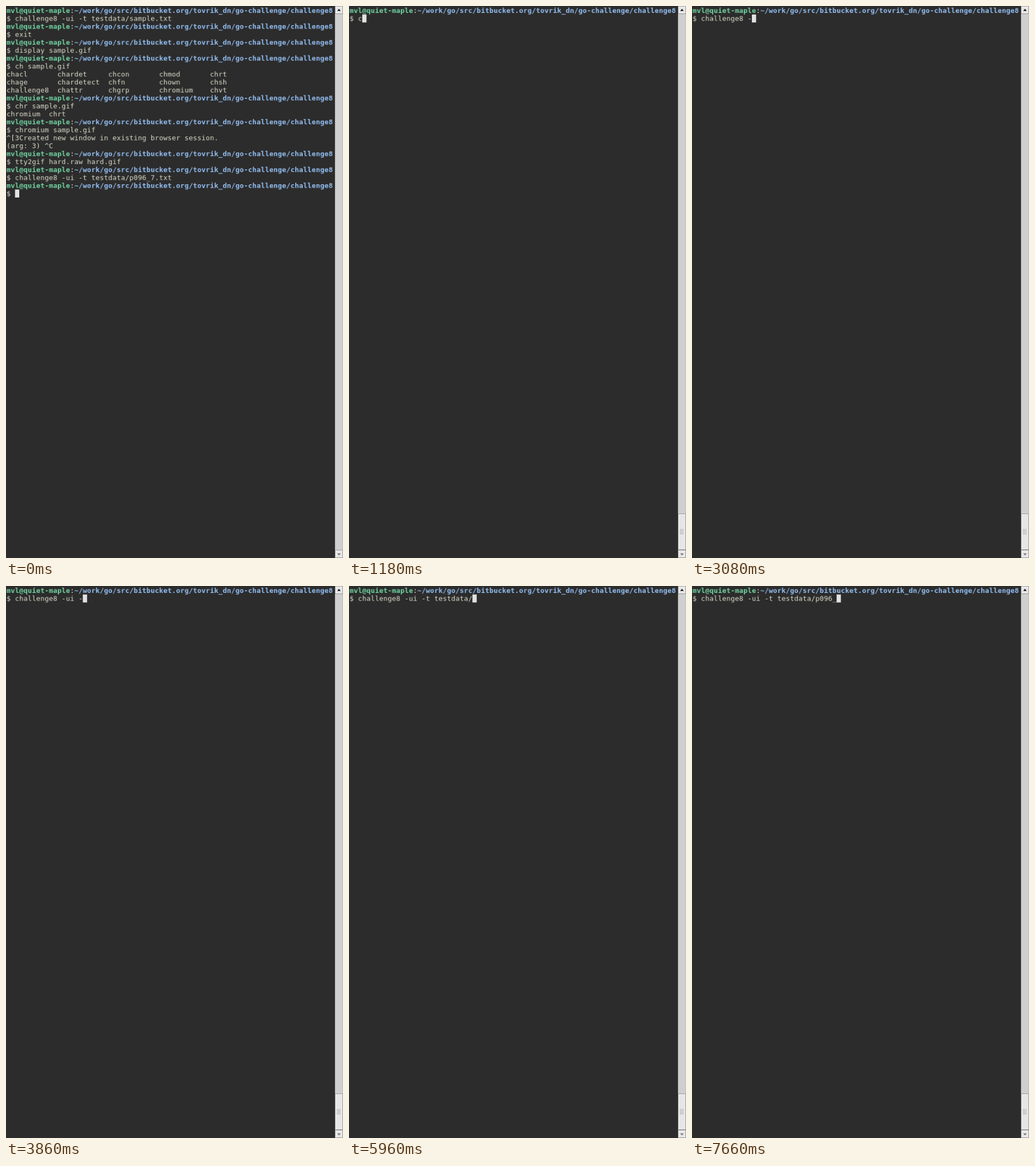
An HTML page with a canvas that plays this animation: 585 px wide and 957 px high, repeating every 8 s.

```html
<!DOCTYPE html>
<html lang="en">
<head>
<meta charset="utf-8">
<title>Terminal session</title>
<style>
html, body { margin: 0; width: 585px; height: 957px; overflow: hidden; background: #2c2c2c; }
canvas { display: block; }
</style>
</head>
<body>
<canvas id="stage" width="585" height="957"></canvas>
<script>
const stage = document.getElementById('stage').getContext('2d');
stage.imageSmoothingQuality = 'high';

// The terminal is drawn on a whole-pixel cell grid, then shrunk onto the stage.
const SCALE = 0.9197, CELL_W = 8, CELL_H = 15;
const screen = document.createElement('canvas');
screen.width = 621;
screen.height = 1041;
const term = screen.getContext('2d');

const LOOP = 8000, CLEAR_AT = 100;
const FG = '#dcdccc', GREEN = '#72d5a3', BLUE = '#94bff3';

const USER = 'mvl@quiet-maple';
const DIR = '~/work/go/src/bitbucket.org/tovrik_dn/go-challenge/challenge8';
const PROMPT = '@prompt';
const COMMAND = 'challenge8 -ui -t testdata/p096_7.txt';

const columns = words => words.split(' ').map(w => w.padEnd(12)).join('');
const history = [
  PROMPT, '$ challenge8 -ui -t testdata/sample.txt',
  PROMPT, '$ exit',
  PROMPT, '$ display sample.gif',
  PROMPT, '$ ch sample.gif',
  columns('chacl chardet chcon chmod chrt'),
  columns('chage chardetect chfn chown chsh'),
  columns('challenge8 chattr chgrp chromium chvt'),
  PROMPT, '$ chr sample.gif',
  'chromium  chrt',
  PROMPT, '$ chromium sample.gif',
  '^[3Created new window in existing browser session.',
  '(arg: 3) ^C',
  PROMPT, '$ tty2gif hard.raw hard.gif',
  PROMPT, '$ ' + COMMAND,
  PROMPT, '$ '
];

// [time in ms, characters of the command shown from then on]
const typing = [
  [100, 0], [1180, 1], [1300, 2], [1490, 3], [1700, 4], [1820, 11],
  [3080, 12], [3630, 13], [3690, 15], [3860, 16], [4840, 17], [4940, 18],
  [5240, 19], [5440, 20], [5630, 21], [5700, 22], [5960, 27],
  [6760, 28], [7070, 29], [7380, 30], [7660, 32]
];

function rect(ctx, color, x, y, w, h) {
  ctx.fillStyle = color;
  ctx.fillRect(x, y, w, h);
}

// Each glyph sits in its own terminal cell.
function write(text, col, row, color = FG, weight = 'normal') {
  term.font = `${weight} 13px "DejaVu Sans Mono", monospace`;
  term.fillStyle = color;
  [...text].forEach((ch, i) => term.fillText(ch, 1 + (col + i) * CELL_W, 13 + row * CELL_H));
}

function drawLine(text, row) {
  if (text !== PROMPT) return write(text, 0, row);
  write(USER, 0, row, GREEN, 'bold');
  write(':', USER.length, row);
  write(DIR, USER.length + 1, row, BLUE, 'bold');
}

function drawTerminal(lines) {
  rect(term, '#2c2c2c', 0, 0, screen.width, screen.height);
  lines.forEach(drawLine);
  const row = lines.length - 1;
  rect(term, '#e2e2e2', 1 + lines[row].length * CELL_W, 1 + row * CELL_H, CELL_W, CELL_H);
  stage.drawImage(screen, 0, 0, screen.width * SCALE, screen.height * SCALE);
}

function box(y, h) {
  rect(stage, '#999', 571, y, 14, h);
  rect(stage, '#f6f6f6', 572, y + 1, 12, h - 2);
  rect(stage, '#e6e6e6', 573, y + 2, 11, h - 3);
}

function arrow(y, dir, color) {
  stage.fillStyle = color;
  stage.beginPath();
  stage.moveTo(575, y);
  stage.lineTo(581, y);
  stage.lineTo(578, y + 3.5 * dir);
  stage.fill();
}

function drawScrollbar(hasThumb) {
  rect(stage, '#bbb', 571, 0, 14, 957);
  rect(stage, '#cfcfcf', 572, 0, 12, 957);
  box(0, 14);
  arrow(8.5, -1, '#000');
  box(943, 14);
  arrow(949, 1, '#777');
  if (!hasThumb) return;
  box(880, 63);
  for (let y = 907; y < 916; y += 2) rect(stage, '#b8b8b8', 574, y, 7, 1);
}

function frame() {
  const t = performance.now() % LOOP;
  const cleared = t >= CLEAR_AT;
  let lines = history;
  if (cleared) {
    const count = typing.filter(([at]) => at <= t).pop()[1];
    lines = [PROMPT, '$ ' + COMMAND.slice(0, count)];
  }
  drawTerminal(lines);
  drawScrollbar(cleared);
  requestAnimationFrame(frame);
}
frame();
</script>
</body>
</html>
```
